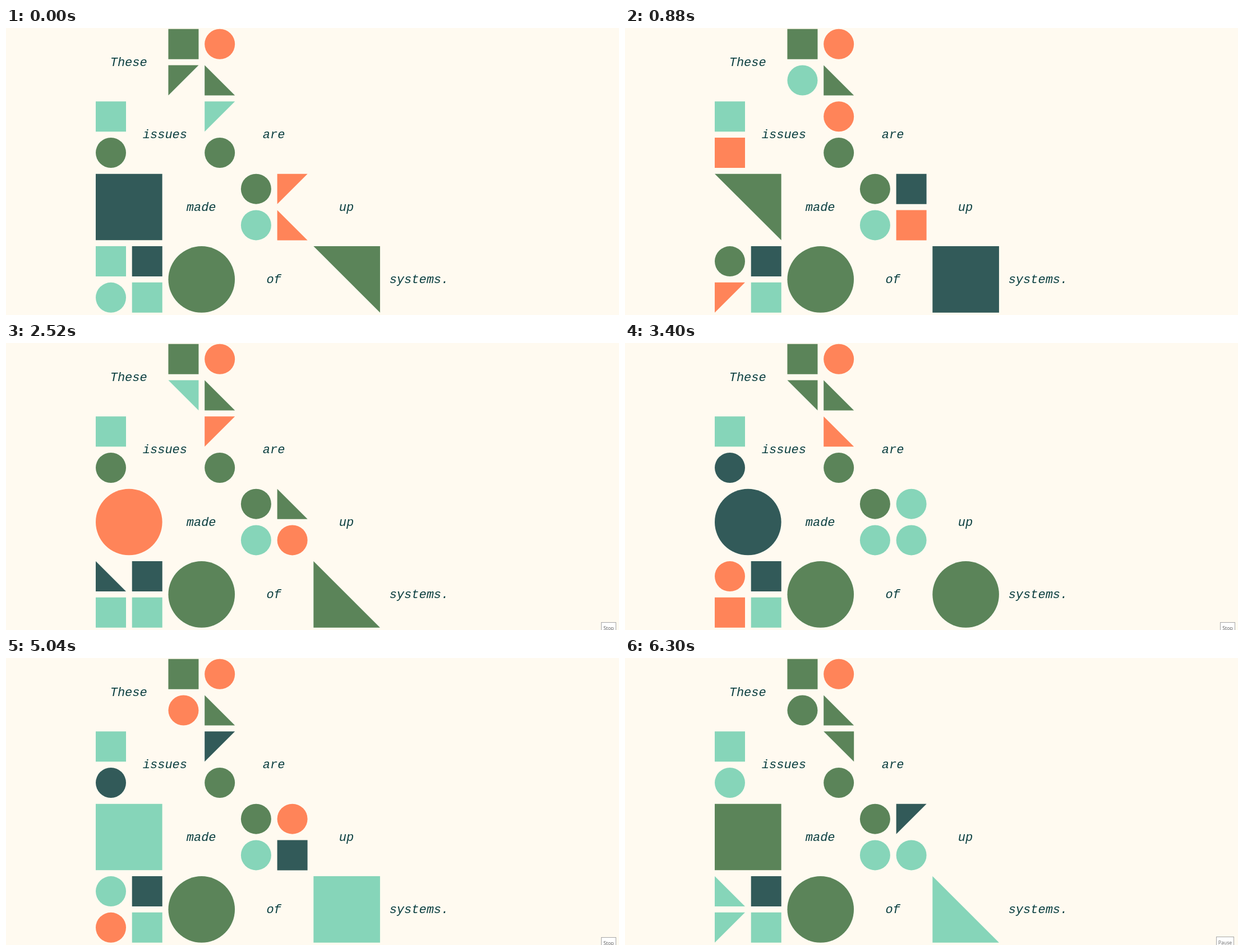
An HTML page with a canvas for the animation above (6430 ms loop, 1093 px wide and 513 px high).

```html
<!DOCTYPE html>
<html lang="en">
<head>
<meta charset="utf-8">
<title>These issues are made up of systems.</title>
<style>
  html, body { margin: 0; width: 100%; height: 100%; overflow: hidden; background: #fffaf0; }
  canvas { display: block; width: 1093px; height: 513px; }
</style>
</head>
<body>
<canvas id="stage"></canvas>
<script>
const W = 1093, H = 513, LOOP = 6430;
const PITCH = 64.72, CELL = 54, BIG = 118.6, LEFT = 160, TOP = 1.8;
const COLORS = { g: '#5b8459', o: '#ff8459', t: '#86d5b9', d: '#325a59' };

const canvas = document.getElementById('stage');
const ctx = canvas.getContext('2d');
const dpr = window.devicePixelRatio || 1;
canvas.width = W * dpr;
canvas.height = H * dpr;

// Each look is a colour letter plus a shape:
// s square, c circle, 1-4 triangle with its corner at TL, TR, BR, BL.
const FIXED = [
  [2, 0, 'gs'], [3, 0, 'oc'], [3, 1, 'g4'], [0, 2, 'ts'], [3, 3, 'gc'],
  [4, 4, 'gc'], [4, 5, 'tc'], [1, 6, 'ds'], [1, 7, 'ts'], [2, 6, 'gc', BIG]
];
const SLOTS = [
  [2, 1], [3, 2], [0, 3], [0, 4, BIG], [5, 4], [5, 5], [0, 6], [0, 7], [6, 6, BIG]
];
const STATES = [
  [0, 'g1 t1 gc ds o1 o4 ts tc g2'],
  [130, 'tc gs gc tc tc gs dc ts oc'],
  [880, 'tc oc os g2 ds os gc o1 ds'],
  [1770, 'ts d4 gs d1 gc o2 ts oc d1'],
  [2520, 't2 o1 gc oc g4 oc d4 ts g4'],
  [3400, 'g2 o4 dc dc tc tc oc os gc'],
  [4160, 'gs tc dc g1 os gc ds tc o1'],
  [5040, 'oc d1 dc ts oc ds tc oc ts'],
  [5800, 'gc g2 tc gs d1 tc t4 t1 t4']
].map(([start, looks]) => [start, looks.split(' ')]);

// Words sit in the middle of two-by-two cell blocks.
const WORDS = [
  ['These', 0, 0], ['issues', 1, 2], ['are', 4, 2], ['made', 2, 4],
  ['up', 6, 4], ['of', 4, 6], ['systems.', 8, 6]
];

// start, opacity, label, box x, box y, box width, text colour
const TIPS = [
  [0, 0], 
  [1130, 0.5, 'Stop', 1061, 499, 27, '#575757'],
  [1260, 1, 'Stop', 1061, 499, 27, '#575757'],
  [5540, 0.5, 'Stop', 1061, 499, 27, '#575757'],
  [5670, 0.5, 'Pause', 1054, 498, 32, '#606060'],
  [5800, 1, 'Pause', 1054, 498, 32, '#606060'],
  [6300, 1, 'Pause', 1054, 498, 32, '#686868']
];

const latest = (list, t) => list.filter(item => item[0] <= t).pop();

function drawShape(col, row, look, size = CELL) {
  const x = LEFT + col * PITCH, y = TOP + row * PITCH;
  const kind = look[1];
  ctx.fillStyle = COLORS[look[0]];
  ctx.beginPath();
  if (kind === 's') {
    ctx.rect(x, y, size, size);
  } else if (kind === 'c') {
    ctx.arc(x + size / 2, y + size / 2, size / 2, 0, Math.PI * 2);
  } else {
    const corners = [[x, y], [x + size, y], [x + size, y + size], [x, y + size]];
    corners.splice((+kind + 1) % 4, 1);
    corners.forEach(p => ctx.lineTo(...p));
  }
  ctx.fill();
}

function drawWords() {
  ctx.font = 'italic 22px "Liberation Mono", "Courier New", monospace';
  ctx.fillStyle = '#0b3f40';
  ctx.textAlign = 'center';
  for (const [word, col, row] of WORDS) {
    ctx.fillText(word, LEFT + BIG / 2 + col * PITCH - 0.6, 68 + row * PITCH);
  }
}

function drawTip([, alpha, label, x, y, width, color]) {
  if (!alpha) return;
  ctx.save();
  ctx.globalAlpha = alpha;
  ctx.fillStyle = '#fff';
  ctx.fillRect(x, y, width, 20);
  ctx.strokeStyle = '#a6a6a6';
  ctx.lineWidth = 1;
  ctx.strokeRect(x + 0.5, y + 0.5, width - 1, 20);
  ctx.font = '8.7px "Open Sans", "Noto Sans", sans-serif';
  ctx.fillStyle = color;
  ctx.fillText(label, x + width / 2, y + 14);
  ctx.restore();
}

function draw(t) {
  ctx.setTransform(dpr, 0, 0, dpr, 0, 0);
  ctx.fillStyle = '#fffaf0';
  ctx.fillRect(0, 0, W, H);
  FIXED.forEach(shape => drawShape(...shape));
  const looks = latest(STATES, t)[1];
  SLOTS.forEach(([col, row, size], i) => drawShape(col, row, looks[i], size));
  drawWords();
  drawTip(latest(TIPS, t));
}

const begin = performance.now();
function tick() {
  draw((performance.now() - begin) % LOOP);
  requestAnimationFrame(tick);
}
tick();
</script>
</body>
</html>
```
